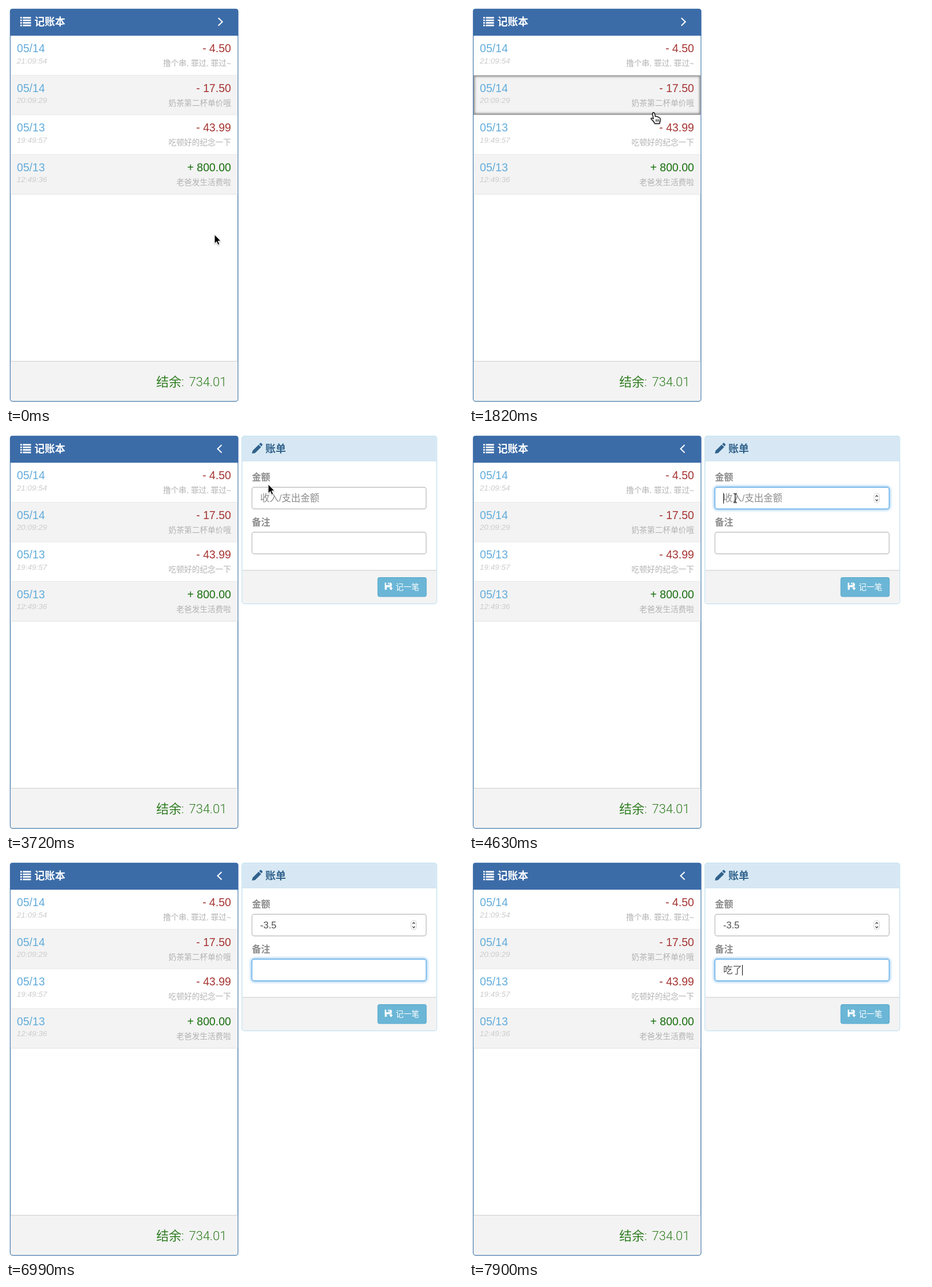
Animation of 800x700 px, one loop 7990 ms. Source, as an HTML page:

```html
<!DOCTYPE html>
<html lang="zh-CN">
<head>
<meta charset="utf-8">
<style>
html, body { margin: 0; width: 100%; height: 100%; overflow: hidden; background: #fff; }
svg { display: block; width: 800px; height: 700px; }
text { font-family: "Liberation Sans", "Noto Sans CJK SC", "Noto Sans CJK", sans-serif; white-space: pre; }
.end { text-anchor: end; }
.date { font-size: 19.6px; fill: #62acdb; }
.time { font-size: 13.7px; font-style: italic; fill: #ccc; }
.amount { font-size: 19.6px; }
.note { font-size: 13.7px; font-weight: 300; fill: #b2b2b2; }
.title { font-size: 18px; font-weight: 700; }
.label { font-size: 16px; font-weight: 700; fill: #8a8a8a; }
.field { font-size: 16.5px; fill: #4c4c4c; }
.total { font-family: Roboto, "Noto Sans CJK SC", "Noto Sans CJK", sans-serif; font-size: 22px; font-weight: 300; fill: #2f7d20; }
</style>
</head>
<body>
<svg id="stage" viewBox="0 0 800 700">
  <defs>
    <filter id="soft" x="-10%" y="-50%" width="120%" height="200%"><feGaussianBlur stdDeviation="2.2"/></filter>
    <filter id="shade" x="-50%" y="-50%" width="200%" height="200%">
      <feDropShadow dx="0" dy="1" stdDeviation="0.9" flood-opacity=".35"/>
    </filter>
    <clipPath id="rowClip"><rect x="8" y="0" width="397.5" height="69"/></clipPath>
  </defs>

  <g id="ledger">
    <rect x="7.5" y="5.5" width="398.5" height="688" rx="4" fill="#fff" stroke="#4a7cab" stroke-width="1.4"/>
    <path d="M7 52.3V9q0-4 4-4H402.5q4 0 4 4V52.3z" fill="#3c6ca8"/>
    <g id="listIcon" fill="#fff"></g>
    <text class="title" x="49.7" y="34.4" fill="#fff">记账本</text>
    <path id="chevron" fill="none" stroke="#fff" stroke-width="2"/>
    <g id="rows"></g>
    <path d="M8.2 623.5H405.3V689.5q0 3.3-3.3 3.3H11.5q-3.3 0-3.3-3.3z" fill="#f3f3f3"/>
    <path d="M8.2 623.3H405.3" stroke="#d2d2d2" stroke-width="1.3"/>
    <text class="total" x="263" y="667">结余:</text>
    <text class="total end" x="386.5" y="667">734.01</text>
    <g id="hover" clip-path="url(#rowClip)">
      <rect x="7" y="-1" width="399.5" height="70.5" fill="none" stroke="#777" stroke-width="5" filter="url(#soft)"/>
      <rect x="8.5" y=".7" width="396.5" height="67.6" fill="none" stroke="#999" stroke-width="1.2"/>
    </g>
  </g>

  <g id="bill">
    <rect x="413" y="5.5" width="341" height="294" rx="4" fill="#fff" stroke="#c3e2ee" stroke-width="1.4"/>
    <path d="M413.6 49V9.5q0-3.4 3.4-3.4H750q3.4 0 3.4 3.4V49z" fill="#d7e8f4"/>
    <path d="M413.6 49H753.4" stroke="#c3e2ee" stroke-width="1.2"/>
    <path d="M430.5 36l1.2-5 10.6-10.6 4.3 4.3L436 35.200z M443.200 19.500l1.800-1.800q.9-.7 1.800 0l2 2q.8.9 0 1.800l-1.700 1.800z" fill="#31628c"/>
    <text class="title" x="454" y="34.400" fill="#31628c">账单</text>
    <text class="label" x="430.500" y="83.300">金额</text>
    <text class="label" x="430.500" y="162.300">备注</text>
    <g id="fields"></g>
    <g id="spinner">
      <rect x="709" y="106" width="9.500" height="16.500" rx="4.500" fill="#fff" stroke="#c4c4c4" stroke-width=".8"/>
      <path d="M711.600 112.200l2.200-2.700 2.200 2.700M711.600 116.400l2.200 2.700 2.200-2.700" fill="none" stroke="#444" stroke-width="1.300"/>
    </g>
    <path d="M413.700 241.200H753.300V295.500q0 3.300-3.300 3.300H417q-3.300 0-3.300-3.300z" fill="#f3f3f3"/>
    <path d="M413.700 241H753.300" stroke="#d8d8d8" stroke-width="1.300"/>
    <rect x="651" y="253.500" width="84.700" height="33.500" rx="3.500" fill="#6bb6d6" stroke="#53a7cd" stroke-width="1.200"/>
    <path d="M663 262.500h2.500v4.500h6v-4.500h2l2 2v4h-2.500v2h-6.500v4.500h-3.500z M668.800 262.500h1.800v3.300h-1.800z M673 269h2v2.700h2.500l-3.500 4-3.500-4h2.500z" fill="#fff"/>
    <text x="682.300" y="275.200" font-size="13.700" font-weight="500" fill="#fff">记一笔</text>
    <path id="caret" stroke="#222" stroke-width="1.200"/>
  </g>

  <g id="cursor" filter="url(#shade)">
    <path id="arrow" d="M0 0V15.800L3.600 12.400 6.100 18.200 8.800 17 6.300 11.400H11z" fill="#000" stroke="#fff" stroke-width="1"/>
    <g id="hand" stroke="#000" stroke-width="1.300" stroke-linejoin="round" stroke-linecap="round">
      <path d="M-1.200 11L-2.800 2.200q-.2-2 1.400-2.200t2.200 1.700L2 7q1.200-1.200 2.700-.2l.5.800q1.700-.8 2.700.6l.4.800q2.200-.3 2.600 2V13.500q-.1 2-1.400 3.700V19.200H1.200q-1.200-2.800-3.200-4.900T-5.600 10.600q1-2 4.400.4z" fill="#fff"/>
      <path d="M3.400 12v3.600M5.800 12v3.600M8.100 12v3.600" stroke-width="1"/>
    </g>
    <path id="beam" d="M-3-8q3 0 3 2V6q0 2-3 2M3-8Q0-8 0-6V6Q0 8 3 8" fill="none" stroke="#222" stroke-width="1.200"/>
  </g>
</svg>
<script>
const $ = id => document.getElementById(id);
const show = (id, on) => $(id).style.display = on ? '' : 'none';

const LOOP = 7990, STEP = LOOP / 88;
const OPEN = 2800, FOCUS_AMOUNT = 4270, FOCUS_NOTE = 6400, HIDE_CURSOR = 5440;
const ROW_TOP = 52.5, ROW_H = 69.5;

const entries = [
  ['05/14', '21:09:54', '- 4.50', '撸个串, 罪过, 罪过~'],
  ['05/14', '20:09:29', '- 17.50', '奶茶第二杯单价哦'],
  ['05/13', '19:49:57', '- 43.99', '吃顿好的纪念一下'],
  ['05/13', '12:49:36', '+ 800.00', '老爸发生活费啦']
];
// time, x, y of the pointer's hot spot
const path = [
  [0, 365, 401], [360, 365, 401], [1000, 318, 300], [1271, 301, 274], [1540, 302, 262],
  [2270, 371, 28], [2540, 372, 25], [2950, 372, 25], [3630, 459, 90], [3810, 459, 90], [4090, 466, 114]
];
const amountTyping = [[FOCUS_AMOUNT, ''], [5500, '-'], [5750, '-3'], [5950, '-3.'], [6150, '-3.5']];
const noteTyping = [[FOCUS_NOTE, ''], [7600, '吃了']];

$('listIcon').innerHTML = [0, 1, 2, 3].map(i => {
  const y = 19.2 + i * 4.5;
  return `<rect x="25" y="${y}" width="2.8" height="2.8"/><rect x="29.5" y="${y}" width="14.2" height="2.8"/>`;
}).join('');

$('rows').innerHTML = entries.map(([date, time, amount, note], i) => `
  <g transform="translate(0 ${ROW_TOP + i * ROW_H})">
    <rect x="8.2" width="397.100" height="${ROW_H}" fill="${i % 2 ? '#f3f3f3' : '#fff'}"/>
    <path d="M8.200 ${ROW_H - .3}H405.300" stroke="#e3e3e3"/>
    <text class="date" x="19" y="28.700">${date}</text>
    <text class="time" x="18.700" y="48.300">${time}</text>
    <text class="amount end" x="394" y="28.700" fill="${amount[0] === '+' ? '#176e0c' : '#a53533'}">${amount}</text>
    <text class="note end" x="394" y="52.600">${note}</text>
  </g>`).join('');

$('fields').innerHTML = [['amount', 95.3], ['note', 174]].map(([id, y]) => `
  <rect id="${id}Glow" x="430.500" y="${y}" width="305" height="38" rx="4" fill="none" stroke="#8cc3ee" stroke-width="4" filter="url(#soft)"/>
  <rect id="${id}Box" x="430.500" y="${y}" width="305" height="38" rx="4" fill="#fff" stroke-width="1.400"/>
  <text id="${id}Text" class="field" x="445" y="${y + 25}"></text>`).join('');

function pointerAt(t) {
  const i = path.findIndex(p => p[0] > t);
  if (i < 0) return path[path.length - 1].slice(1);
  const [t0, x0, y0] = path[i - 1], [t1, x1, y1] = path[i];
  const p = (t - t0) / (t1 - t0), e = p * p * (3 - 2 * p);
  return [x0 + (x1 - x0) * e, y0 + (y1 - y0) * e];
}

const typed = (table, t) => table.filter(s => s[0] <= t).pop() || [0, ''];

function setField(id, value, focused) {
  $(id + 'Text').textContent = value;
  $(id + 'Box').setAttribute('stroke', focused ? '#66afe9' : '#c2c2c2');
  show(id + 'Glow', focused);
}

function draw(now) {
  const t = Math.floor((now % LOOP + 8) / STEP) * STEP;
  const open = t >= OPEN;
  const [x, y] = pointerAt(t);

  const row = x < 406 ? Math.floor((y - ROW_TOP) / ROW_H) : -1;
  const onRow = row >= 0 && row < entries.length;
  const onChevron = x > 362 && x < 390 && y > 15 && y < 40;
  const onInput = open && x > 430 && y > 95;
  const hand = onRow || onChevron;
  show('hover', onRow);
  if (onRow) $('hover').setAttribute('transform', `translate(0 ${ROW_TOP + row * ROW_H - .2})`);
  show('cursor', t < HIDE_CURSOR);
  $('cursor').setAttribute('transform', `translate(${x.toFixed(1)} ${y.toFixed(1)})`);
  show('hand', hand);
  show('beam', onInput);
  show('arrow', !hand && !onInput);

  $('chevron').setAttribute('d', open ? 'M377.500 21L370.500 27.700 377.500 34.500' : 'M371.700 21L378.700 27.700 371.700 34.500');
  show('bill', open);
  if (!open) return;

  const onNote = t >= FOCUS_NOTE, onAmount = t >= FOCUS_AMOUNT && !onNote;
  const [amountTime, amount] = typed(amountTyping, t);
  const [noteTime, note] = typed(noteTyping, t);
  setField('amount', amount || '收入/支出金额', onAmount);
  $('amountText').style.fill = amount ? '' : '#8c8c8c';
  setField('note', note, onNote);
  show('spinner', onInput);

  const value = onNote ? note : amount;
  const since = t - (onNote ? noteTime : amountTime);
  show('caret', (onAmount || onNote) && since % 1000 < 500);
  const width = value ? $(onNote ? 'noteText' : 'amountText').getComputedTextLength() : 0;
  $('caret').setAttribute('d', `M${445.6 + width} ${onNote ? 184 : 105.3}v18.500`);
}

function tick() {
  draw(performance.now());
  requestAnimationFrame(tick);
}
tick();
</script>
</body>
</html>
```
